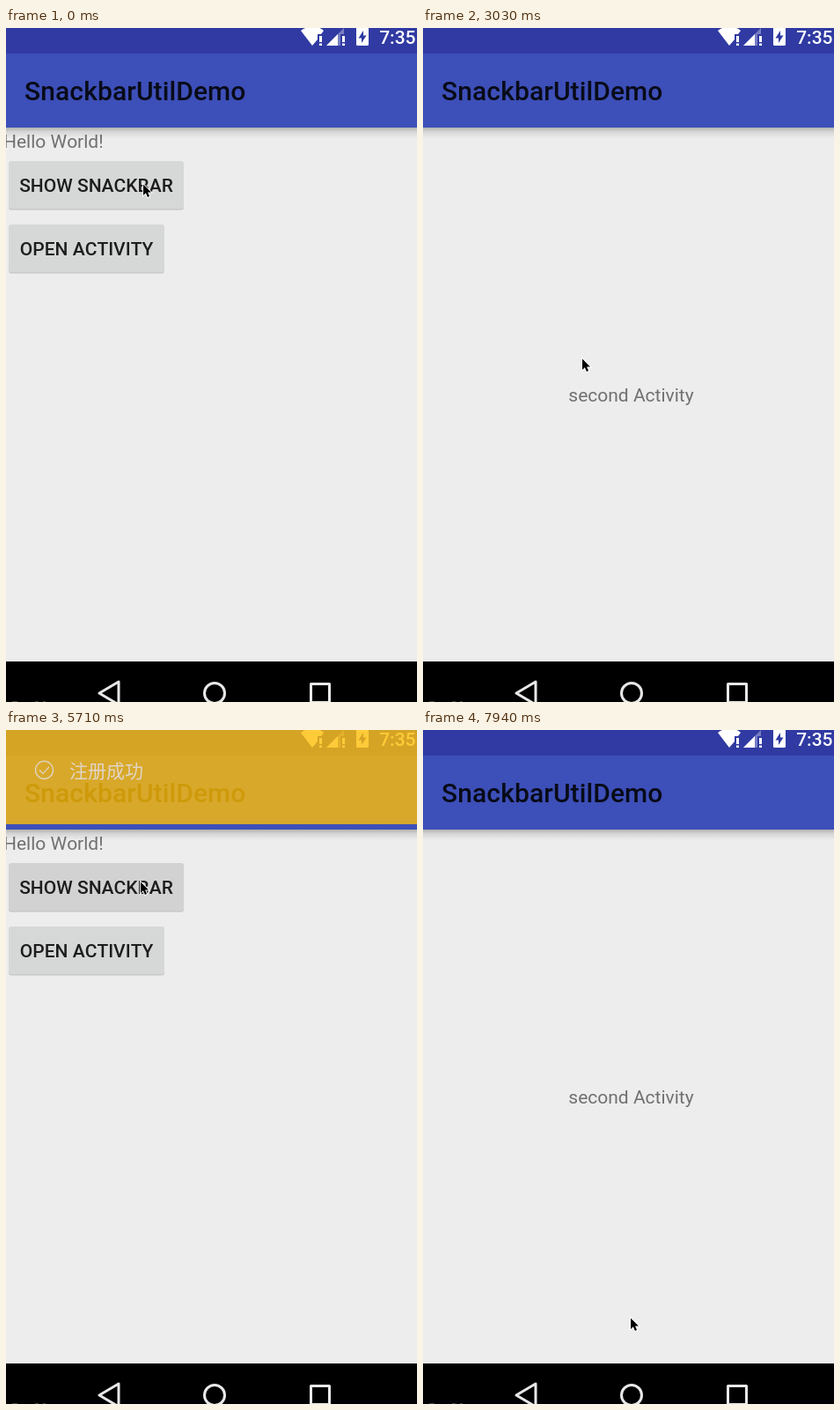
An HTML page that plays this animation: 467 by 765 pixels, repeating every 8000 ms.

```html
<!DOCTYPE html>
<html lang="en">
<head>
<meta charset="utf-8">
<title>Snackbar demo</title>
<style>
  html, body { margin: 0; width: 100%; height: 100%; overflow: hidden; background: #000; }
  svg { display: block; width: 467px; height: 765px; }
  text { font: 400 21px Roboto, sans-serif; font-kerning: none; }
  .medium { font-weight: 500; }
  .title { font-size: 30px; letter-spacing: .1px; fill: #080b18; }
  .label { text-anchor: middle; fill: #1d1d1d; }
  .grey { fill: #707070; }
  .cjk { font-family: "Noto Sans CJK SC", "Noto Sans CJK", sans-serif; fill: #e3dde0; }
</style>
</head>
<body>
<svg viewBox="0 0 467 765">
  <defs>
    <linearGradient id="fade" x2="0" y2="1">
      <stop offset="0" stop-opacity=".25"/>
      <stop offset=".4" stop-opacity=".1"/>
      <stop offset="1" stop-opacity="0"/>
    </linearGradient>
    <g id="frame">
      <rect width="467" height="719" fill="#ededed"/>
      <rect y="719" width="467" height="60"/>
      <rect y="113" width="467" height="12" fill="url(#fade)"/>
      <rect width="467" height="29" fill="#303aa2"/>
      <rect y="29" width="467" height="84" fill="#3d4fb8"/>
      <text class="medium title" x="21" y="82">SnackbarUtilDemo</text>
    </g>
  </defs>

  <g id="main">
    <use href="#frame"/>
    <text class="grey" x="-3" y="136">Hello World!</text>
    <rect x="3" y="152.5" width="199" height="54" rx="3" fill="#bfc0c0"/>
    <rect id="show" x="3" y="151" width="199" height="54.5" rx="3"/>
    <text class="medium label" x="102.5" y="186">SHOW SNACKBAR</text>
    <rect x="3" y="224.5" width="177" height="54" rx="3" fill="#bfc0c0"/>
    <rect id="open" x="3" y="223" width="177" height="54.5" rx="3"/>
    <text class="medium label" x="91.5" y="258">OPEN ACTIVITY</text>
  </g>

  <g id="second">
    <use href="#frame"/>
    <text class="grey" x="236.5" y="424" text-anchor="middle">second Activity</text>
  </g>

  <!-- status bar -->
  <g fill="#fff">
    <path d="M335 3Q339 0 343 -1H353Q358 0 361 3L358 7H354V13L348 20Z"/>
    <path d="M356 9h3v7h-3zM356 17.500h3v2.500h-3z"/>
    <path d="M364 20L384 0V7H380V20Z" opacity=".35"/>
    <path d="M364 20L377 7V20ZM382 9h3v7h-3zM382 17.500h3v2.500h-3z"/>
    <rect x="398" y="-2" width="14" height="22" rx="1.500"/>
    <path d="M406 3L400.500 11.500H404V17L409.500 8.500H406Z" fill="#303aa2"/>
    <text class="medium" x="465.5" y="18" text-anchor="end">7:35</text>
  </g>

  <!-- navigation bar -->
  <g fill="none" stroke="#e8e8e8" stroke-width="3" stroke-linejoin="round">
    <path d="M128 742V768L106 755Z"/>
    <circle cx="237" cy="755" r="11.500"/>
    <rect x="346.500" y="744.500" width="21" height="21"/>
  </g>
  <path d="M7 764.500h6M33 764.500h4M42 764.500h3" stroke="#444"/>

  <g id="bar">
    <rect width="467" height="113" fill="#ffbe07" fill-opacity=".8"/>
    <g id="message">
      <g fill="none" stroke="#e3dde0" stroke-width="1.300">
        <circle cx="43.500" cy="51.500" r="10"/>
        <path d="M38 51.500L42 55.500L49 48"/>
      </g>
      <text class="cjk" x="72" y="60">注册成功</text>
    </g>
  </g>

  <path id="cursor" d="M1 1.500V14L3.900 11.300L5.900 16L8 15.100L6.100 10.500H10Z" stroke="#fff" stroke-width="1.800" paint-order="stroke"/>
</svg>
<script>
// The screen refreshes in steps, so the picture holds between them.
const LOOP = 8000, START = 488, STEP = 148.8;
const SHOWS = [457, 5516], OPENS = [1506, 6449], CLOSE = 4130;
const STAY = 1712, SLIDE = 250;
// pointer moves: start, end, x, y
const MOVES = [
  [0, 0, 155, 176], [650, 1230, 132, 247], [2890, 3010, 180, 374], [3030, 3160, 187, 643],
  [3330, 3900, 131, 748], [4510, 5090, 152, 171], [5700, 6140, 140, 230],
  [6890, 7180, 245, 290], [7640, 7920, 235, 666]
];

const $ = id => document.getElementById(id);
const clamp = x => Math.min(1, Math.max(0, x));
const progress = (t, start, length) => clamp((t - start) / length);
const smooth = x => x * x * (3 - 2 * x);
const slide = x => 1 - (1 - x * x) ** 4;
const brake = x => 1 - (1 - x) ** 5;
const latest = (times, t) => times.filter(s => s <= t).pop() ?? -LOOP;

const move = (id, x, y) => $(id).setAttribute("transform", `translate(${x} ${y})`);
const fade = (id, opacity) => $(id).setAttribute("opacity", opacity);
const press = (id, times, t) => {
  const down = times.some(s => t > s - 50 && t < s + 200);
  $(id).setAttribute("fill", down ? "#d3d2d2" : "#d6d8d7");
};

function drawBar(t) {
  const show = latest(SHOWS, t);
  const shown = slide(progress(t, show, SLIDE)) - slide(progress(t, show + STAY, SLIDE));
  move("bar", 0, 113 * (shown - 1));
  fade("message", progress(t, show + 70, 110) * .3 + .7 * shown ** 4);
}

function drawSecond(t) {
  const open = latest(OPENS, t);
  const closing = open < CLOSE ? t - CLOSE : 0;
  const drop = 1 - brake(progress(t, open, 350)) + progress(closing, 0, 250) ** 2;
  move("second", 0, 64 * drop);
  fade("second", open < 0 ? 0 : brake(progress(t, open, 200)) * (1 - progress(closing, 100, 150)));
}

function drawCursor(t) {
  let x = 0, y = 0;
  for (const [start, end, toX, toY] of MOVES) {
    const p = smooth(progress(t, start, end - start || 1));
    if (end === 0) [x, y] = [toX, toY];
    else [x, y] = [x + (toX - x) * p, y + (toY - y) * p];
  }
  move("cursor", Math.round(x), Math.round(y));
}

function draw(now) {
  const t = START + Math.floor((now % LOOP - START) / STEP) * STEP;
  drawBar(t);
  drawSecond(t);
  drawCursor(t);
  press("show", SHOWS, t);
  press("open", OPENS, t);
  requestAnimationFrame(draw);
}
draw(0);
</script>
</body>
</html>
```
